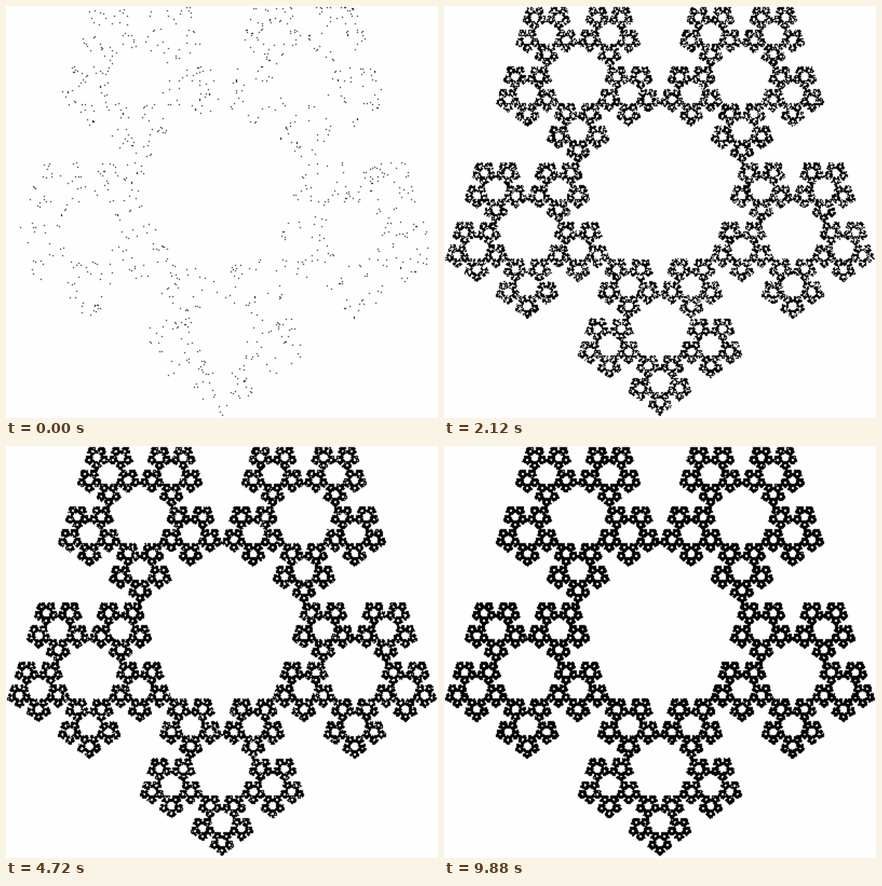
An HTML page with a canvas for the animation above (9.92 s loop, 600 by 573 pixels).

```html
<!DOCTYPE html>
<html lang="en">
<head>
<meta charset="utf-8">
<title>Chaos game on a pentagon</title>
<style>
  html, body { margin: 0; width: 100%; height: 100%; overflow: hidden; background: #fefefe; }
  canvas { display: block; }
</style>
</head>
<body>
<canvas id="stage" width="600" height="573"></canvas>
<script>
const LOOP = 9920, STEP = 40, PER_STEP = 1000;
const TOTAL = LOOP / STEP * PER_STEP;
const CX = 200, CY = 170.2, RADIUS = 209;
const RATIO = (3 - Math.sqrt(5)) / 2; // the five copies just touch

const stage = document.getElementById('stage').getContext('2d');
stage.imageSmoothingQuality = 'high';

// Points are plotted on a coarser grid, then enlarged.
const grid = document.createElement('canvas');
grid.width = 400;
grid.height = 382;
const plot = grid.getContext('2d');

function seededRandom(seed) {
  return () => {
    seed = seed + 0x6D2B79F5 | 0;
    let t = Math.imul(seed ^ seed >>> 15, 1 | seed);
    t = t + Math.imul(t ^ t >>> 7, 61 | t) ^ t;
    return ((t ^ t >>> 14) >>> 0) / 4294967296;
  };
}

const corners = Array.from({ length: 5 }, (_, i) => {
  const angle = Math.PI / 2 + i * Math.PI * 2 / 5;
  return [CX + RADIUS * Math.cos(angle), CY + RADIUS * Math.sin(angle)];
});

// Chaos game: jump towards a random corner again and again.
const random = seededRandom(7);
const xs = new Uint16Array(TOTAL), ys = new Uint16Array(TOTAL);
let [x, y] = corners[0];
for (let i = 0; i < TOTAL; i++) {
  const [vx, vy] = corners[Math.floor(random() * 5)];
  x = vx + (x - vx) * RATIO;
  y = vy + (y - vy) * RATIO;
  xs[i] = x;
  ys[i] = y;
}

let drawn = 0;

function clear() {
  plot.fillStyle = '#fefefe';
  plot.fillRect(0, 0, grid.width, grid.height);
  plot.fillStyle = '#000';
  drawn = 0;
}

function render() {
  const step = Math.floor(performance.now() % LOOP / STEP);
  const count = (step + 1) * PER_STEP;
  if (count < drawn) clear();
  if (count > drawn) {
    for (; drawn < count; drawn++) plot.fillRect(xs[drawn], ys[drawn], 1, 1);
    stage.drawImage(grid, 0, 0, 600, 573);
  }
  requestAnimationFrame(render);
}

clear();
render();
</script>
</body>
</html>
```
